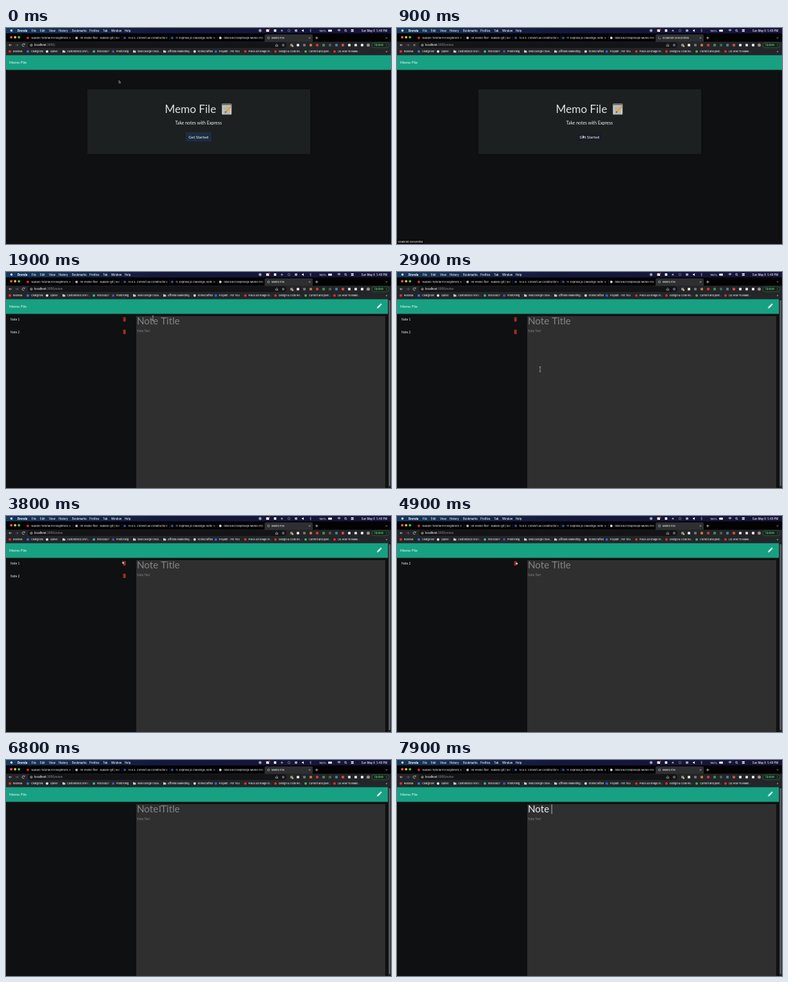
An HTML page with a canvas that plays this animation: 600 by 338 pixels, repeating every 8 s.

```html
<!DOCTYPE html>
<html lang="en">
<head>
<meta charset="utf-8">
<title>Memo File</title>
<style>
html, body { margin: 0; width: 100%; height: 100%; overflow: hidden; background: #0f1011; }
canvas { display: block; width: 600px; height: 338px; }
</style>
</head>
<body>
<canvas id="stage"></canvas>
<script>
const canvas = document.getElementById('stage');
const ctx = canvas.getContext('2d');
const ratio = window.devicePixelRatio || 1;
canvas.width = 600 * ratio;
canvas.height = 338 * ratio;

const LOOP = 8000, STEP = 100;
const LOADING = 800, NOTES = 1000, DELETE_1 = 4300, DELETE_2 = 5000, FOCUS = 7300, TYPING = 7600;
const UI = 'Inter, sans-serif', PAGE = 'Lato, sans-serif';
const APP = 'Memo File';

// Pointer keys: time, x, y
const PATH = [
  [0, 176, 84], [200, 192, 98], [600, 290, 169], [1100, 290, 169], [1700, 229, 72],
  [1900, 229, 72], [2400, 246, 120], [2800, 228, 162], [3200, 196, 96], [3500, 182, 72],
  [3800, 182, 72], [4200, 186, 73], [5000, 186, 73], [5200, 204, 137], [5400, 215, 97],
  [6300, 238, 79], [6700, 240, 76], [7200, 240, 76], [7400, 273, 75], [8000, 273, 75]
];

function box(x, y, w, h, color, radius = 0) {
  ctx.fillStyle = color;
  ctx.beginPath();
  ctx.roundRect(x, y, w, h, radius);
  ctx.fill();
}

function dot(x, y, r, color) {
  ctx.fillStyle = color;
  ctx.beginPath();
  ctx.arc(x, y, r, 0, 7);
  ctx.fill();
}

function ring(x, y, r, color, from = 0, to = 7) {
  ctx.strokeStyle = color;
  ctx.lineWidth = 0.7;
  ctx.beginPath();
  ctx.arc(x, y, r, from, to);
  ctx.stroke();
}

function line(points, color, width = 0.7) {
  ctx.strokeStyle = color;
  ctx.lineWidth = width;
  ctx.beginPath();
  points.forEach(([x, y]) => ctx.lineTo(x, y));
  ctx.stroke();
}

function shape(points, color, edge) {
  ctx.beginPath();
  points.forEach(([x, y]) => ctx.lineTo(x, y));
  ctx.closePath();
  ctx.fillStyle = color;
  ctx.fill();
  if (edge) {
    ctx.strokeStyle = edge;
    ctx.lineWidth = 0.5;
    ctx.stroke();
  }
}

function text(str, x, y, size, color, family = UI, align = 'left', weight = family === UI ? 500 : 400) {
  ctx.font = `${weight} ${size}px ${family}`;
  ctx.textAlign = align;
  ctx.fillStyle = color;
  ctx.fillText(str, x, y);
}

function cross(x, y, r, color) {
  line([[x - r, y - r], [x + r, y + r]], color, 0.6);
  line([[x + r, y - r], [x - r, y + r]], color, 0.6);
}

function at(x, y, angle, draw) {
  ctx.save();
  ctx.translate(x, y);
  ctx.rotate(angle);
  draw();
  ctx.restore();
}

function menuBar() {
  const tint = ctx.createLinearGradient(0, 0, 600, 0);
  tint.addColorStop(0, '#15395f');
  tint.addColorStop(0.4, '#14183d');
  tint.addColorStop(1, '#16133b');
  box(0, 0, 600, 8.5, tint);
  dot(8.5, 4, 1.8, '#f0f0f4');
  text('Bronda', 18, 5.6, 4.4, '#ffffff', UI, 'left', 700);
  const items = [['File', 40], ['Edit', 53], ['View', 67], ['History', 82], ['Bookmarks', 103],
    ['Profiles', 130], ['Tab', 151], ['Window', 164], ['Help', 185]];
  items.forEach(([name, x]) => text(name, x, 5.6, 4.2, '#f4f4f8'));

  const ink = '#eeeef4';
  ring(396, 4, 1.9, ink);
  dot(396, 4, 0.9, ink);
  box(405.5, 2, 4.5, 4, ink, 0.5);
  dot(410.2, 2.4, 1.2, '#d8393e');
  box(417.5, 2, 3.8, 4, ink, 0.8);
  dot(430, 4, 1.6, '#8f90ab');
  ring(441, 4, 1.8, '#8f90ab');
  box(450, 2.2, 4, 3.6, '#aaaac0', 0.5);
  shape([[461, 3.2], [462.2, 3.2], [464, 1.8], [464, 6.2], [462.2, 4.8], [461, 4.8]], ink);
  line([[473, 2.6], [476, 5.2], [474.5, 6.4], [474.5, 1.6], [476, 2.8], [473, 5.2]], '#9295ab', 0.5);
  text('100%', 488, 5.6, 4.1, ink);
  box(502, 2.4, 6, 3.4, ink, 0.8);
  [1.2, 2.4, 3.6].forEach(r => ring(519, 5.8, r, ink, 3.9, 5.5));
  ring(529, 3.7, 1.4, ink);
  line([[530, 4.7], [531.2, 6]], ink);
  box(537.5, 2.1, 4.5, 1.6, ink, 0.8);
  box(537.5, 4.4, 4.5, 1.6, ink, 0.8);
  text('Sun May 8  5:49 PM', 594, 5.6, 4.2, ink, UI, 'right');
}

function tabs(loading) {
  box(0, 8.5, 600, 13, '#030304');
  ['#f25b54', '#eebb3c', '#52c045'].forEach((c, i) => dot(8.2 + i * 6, 14.5, 1.9, c));
  const list = [
    [34, '#e02b2b', 'Nubaro Tutorial For Beginners'],
    [110, '#b9b4d0', 'mi-memo-filer · Nubaro-git | N'],
    [185, '#3b4f9c', '10.5.5. Convert All Constructor'],
    [259, '#3b4f9c', '11. Express.js Challenge: Note'],
    [334, '#d8dade', 'milor4827/Expressjs-Memo-Filer']
  ];
  box(403, 10, 75, 13, '#2e2f31', 2);
  list.forEach(([x, color, title], i) => {
    dot(x, 15.5, 1.9, color);
    ctx.save();
    ctx.beginPath();
    ctx.rect(x + 5, 10, 59, 11);
    ctx.clip();
    text(title, x + 5.5, 17.1, 4, '#d4d6da');
    ctx.restore();
    cross(x + 65.5, 15.5, 1.1, '#d0d2d6');
    if (i < 4) box(x + 70, 12.5, 0.5, 6, '#3a3b3f');
  });
  if (loading) {
    ring(409, 15.5, 1.8, '#7fa9e8', 0, 4.5);
  } else {
    ring(409, 15.5, 1.8, '#9b9da1');
    line([[407.4, 15.5], [410.6, 15.5]], '#9b9da1', 0.5);
  }
  text(loading ? 'localhost:3000/notes' : APP, 414, 17.1, 4, '#e4e5e8');
  cross(473, 15.5, 1.1, '#d6d8dc');
  line([[482, 15.5], [486.5, 15.5]], '#e0e2e6');
  line([[484.2, 13.2], [484.2, 17.8]], '#e0e2e6');
  line([[591.5, 14.7], [593, 16.2], [594.5, 14.7]], '#c6c8cc');
}

function addressBar(path, loading) {
  box(0, 21.5, 600, 21, '#242528');
  const ink = '#dcdee2';
  line([[9, 26.7], [4.8, 26.7]], ink);
  line([[6.6, 24.9], [4.8, 26.7], [6.6, 28.5]], ink);
  line([[14.8, 26.7], [19, 26.7]], '#74767a');
  line([[17.2, 24.9], [19, 26.7], [17.2, 28.5]], '#74767a');
  if (loading) {
    cross(27, 26.7, 1.7, ink);
  } else {
    ring(27, 26.7, 1.9, ink, 0.6, 5.8);
    shape([[27.4, 25.9], [29.4, 25.9], [29.4, 23.9]], ink);
  }
  box(34, 22.3, 403, 8.9, '#131416', 4.4);
  ring(39.5, 26.8, 1.6, ink);
  box(39.2, 26.4, 0.6, 1.4, ink);
  text('localhost', 44, 28.4, 4.3, '#f6f6f8');
  const hostWidth = ctx.measureText('localhost').width;
  text(':3000' + path, 44 + hostWidth, 28.4, 4.3, '#85888c');

  line([[420.2, 26], [420.2, 28.6], [423.6, 28.6], [423.6, 26]], ink, 0.6);
  line([[421.9, 27.4], [421.9, 24.4]], ink, 0.6);
  const star = Array.from({ length: 10 }, (_, i) => {
    const a = i * Math.PI / 5 - Math.PI / 2, r = i % 2 ? 0.9 : 2;
    return [432 + r * Math.cos(a), 26.8 + r * Math.sin(a)];
  });
  shape(star, '#131416', ink);

  const extensions = ['#8f8f8c', '#e6e6e6', '#74777c', '#c9773f', '#d23535', '#3f8f55',
    '#43684c', '#4a7fa6', '#d94b41', '#e6e6e8', '#dcdee2', '#f0f0f2'];
  extensions.forEach((c, i) => box(443 + i * 10, 24.8, 4, 4, c, 1));
  dot(446.8, 28.4, 1.3, '#e5b33c');
  dot(564.5, 26.8, 2.5, '#9c9288');
  box(570, 22.8, 27, 8, '#17211c', 4);
  ctx.strokeStyle = '#3d8a57';
  ctx.lineWidth = 0.5;
  ctx.stroke();
  text('Update', 574, 28.3, 4.2, '#68c787');
  [-1.5, 0, 1.5].forEach(d => dot(593, 26.8 + d, 0.45, '#68c787'));
}

function bookmarks() {
  const list = [
    [6, '#e33131', 'Reelova'], [34, '#3278e8', 'Chatgrove'], [64, '#e8e8e8', 'Quilvo'],
    [90, 0, 'Customized Orvi I...'], [137, '#3eada5', 'milor4827'], [167, '#584bb0', 'PhotoTwig'],
    [200, 0, 'Web Design Chea...'], [247, 0, 'Affiliate Marketing...'], [294, '#dedede', 'homecrafted'],
    [327, '#2867e7', 'Folyant :: For You'], [373, '#da3030', 'Place An Image In...'],
    [420, '#da3030', 'Design & Code Re...'], [467, '#45ad65', 'Current and past...'],
    [512, '#da3030', '(4) How To Make...']
  ];
  list.forEach(([x, color, name]) => {
    if (color) {
      dot(x, 36.8, 2, color);
    } else {
      box(x - 2, 34.7, 2.2, 2, '#c9cbcf', 0.4);
      box(x - 2, 35.4, 4.4, 3.2, '#c9cbcf', 0.4);
    }
    text(name, x + 5, 38.3, 3.85, '#e4e6ea');
  });
  text('»', 593, 38, 4.5, '#c6c8cc', UI, 'center');
}

function memoIcon() {
  box(336.5, 118.5, 15, 17, '#c9cbc7', 1);
  box(336.5, 118.5, 15, 2.4, '#73766f', 1);
  for (let y = 123; y < 134; y += 2.2) box(338.5, y, 10.5, 0.6, '#858983');
  at(346.3, 127.4, -0.8, () => {
    box(-5, -1.3, 10, 2.6, '#e3a237');
    box(5, -1.3, 2, 2.6, '#d98078', 0.7);
    shape([[-5, -1.3], [-7.5, 0], [-5, 1.3]], '#493b2c');
  });
}

function navbar(width) {
  box(0, 42.5, width, 23, '#17a082');
  text(APP, 5, 55.7, 5.8, '#f0f8f6', PAGE);
}

function home(hovered, pressed) {
  navbar(600);
  box(127, 96, 347, 101, '#1d2021');
  text(APP, 247.5, 133, 17.2, '#e0e1e1', PAGE);
  memoIcon();
  text('Take notes with Express', 300, 151.4, 6.9, '#f4f4f4', PAGE, 'center');
  box(280, 163, 40, 14.8, pressed ? '#191d24' : hovered ? '#1a2633' : '#1b2d41', 1);
  if (pressed) {
    ctx.strokeStyle = '#1b2740';
    ctx.lineWidth = 0.6;
    ctx.stroke();
  }
  text('Get Started', 300, 172.5, 6.1, '#fafafa', PAGE, 'center');
}

function trash(x, y) {
  box(x - 2.3, y - 2.8, 4.6, 0.9, '#c33632');
  box(x - 0.9, y - 3.4, 1.8, 0.8, '#c33632');
  box(x - 2, y - 1.6, 4, 5, '#b5302d', 0.6);
  [-0.9, 0.7].forEach(d => box(x + d, y - 0.8, 0.4, 3.2, '#5e1a19'));
}

function pencil() {
  at(581.5, 53.5, -Math.PI / 4, () => {
    box(-2.6, -1.3, 5.2, 2.6, '#f2f8f6');
    box(3.1, -1.3, 1.7, 2.6, '#f2f8f6', 0.5);
    shape([[-2.9, -1.3], [-5, 0], [-2.9, 1.3]], '#f2f8f6');
  });
}

function notesPage(t) {
  navbar(595.5);
  box(595.5, 42.5, 4.5, 296, '#202122');
  box(596.6, 44, 2.4, 291, '#606163', 1.2);
  pencil();

  const notes = [];
  if (t < DELETE_1) notes.push('Note 1');
  if (t < DELETE_2) notes.push('Note 2');
  notes.forEach((name, i) => {
    text(name, 7, 76.3 + i * 19.6, 4.7, '#f8f8f8', PAGE);
    trash(184.6, 74 + i * 19.6);
  });

  box(203, 69, 388, 269, '#2f2f30');
  const typed = t < TYPING ? '' : ['N', 'No', 'Not', 'Note '][Math.floor((t - TYPING) / STEP)];
  text(typed || 'Note Title', 204, 82.3, 15.2, typed ? '#eeeeee' : '#858585', PAGE);
  text('Note Text', 204, 94.4, 4.7, '#858585', PAGE);
  if (t >= FOCUS) {
    ctx.font = `15.2px ${PAGE}`;
    box(204 + ctx.measureText(typed).width - 0.4, 69.5, 0.8, 15, '#d6d6d6');
  }
}

function pointerAt(t) {
  const i = PATH.findIndex(key => key[0] > t);
  const [t0, x0, y0] = PATH[i - 1], [t1, x1, y1] = PATH[i];
  const p = (t - t0) / (t1 - t0), e = p * p * (3 - 2 * p);
  return [x0 + (x1 - x0) * e, y0 + (y1 - y0) * e];
}

function pointer(x, y, kind) {
  at(x, y, 0, () => {
    if (kind === 'beam') {
      line([[-1.3, -3.5], [0, -3], [1.3, -3.5]], '#dddddd', 0.6);
      line([[0, -3], [0, 4]], '#dddddd', 0.6);
      line([[-1.3, 4.5], [0, 4], [1.3, 4.5]], '#dddddd', 0.6);
    } else if (kind === 'hand') {
      shape([[-0.6, -1.8], [0.2, -1.8], [0.4, 0], [2.3, 0.6], [2.1, 2.6], [0.2, 3],
        [-1.7, 1], [-1.3, 0.5], [-0.5, 1]], '#ececec', '#222222');
    } else {
      shape([[0, -2], [0, 2.2], [0.9, 1.4], [1.6, 2.7], [2.2, 2.4], [1.6, 1.2], [2.8, 1]],
        '#151515', '#d8d8d8');
    }
  });
}

function draw(t) {
  ctx.setTransform(ratio, 0, 0, ratio, 0, 0);
  box(0, 0, 600, 338, '#0f1011');
  const onNotes = t >= NOTES;
  const loading = t >= LOADING && !onNotes;
  const [x, y] = pointerAt(t);
  const overButton = !onNotes && x > 280 && y > 163;
  const overTrash = onNotes && x > 180 && x < 189 && y < 79;
  const overField = onNotes && x > 203 && y > 69;

  menuBar();
  tabs(loading);
  addressBar(t >= LOADING ? '/notes' : '/', loading);
  bookmarks();
  if (onNotes) notesPage(t);
  else home(overButton, loading);
  if (overButton) {
    box(0, 331.5, 42, 6.5, '#050506', 1);
    text('localhost:3000/notes', 1.5, 336.2, 3.8, '#eeeff2');
  }
  if (t < TYPING) pointer(x, y, overButton || overTrash ? 'hand' : overField ? 'beam' : 'arrow');
}

const start = performance.now();
function tick() {
  const elapsed = (performance.now() - start) % LOOP;
  draw(Math.floor(elapsed / STEP) * STEP);
  requestAnimationFrame(tick);
}
tick();
</script>
</body>
</html>
```
